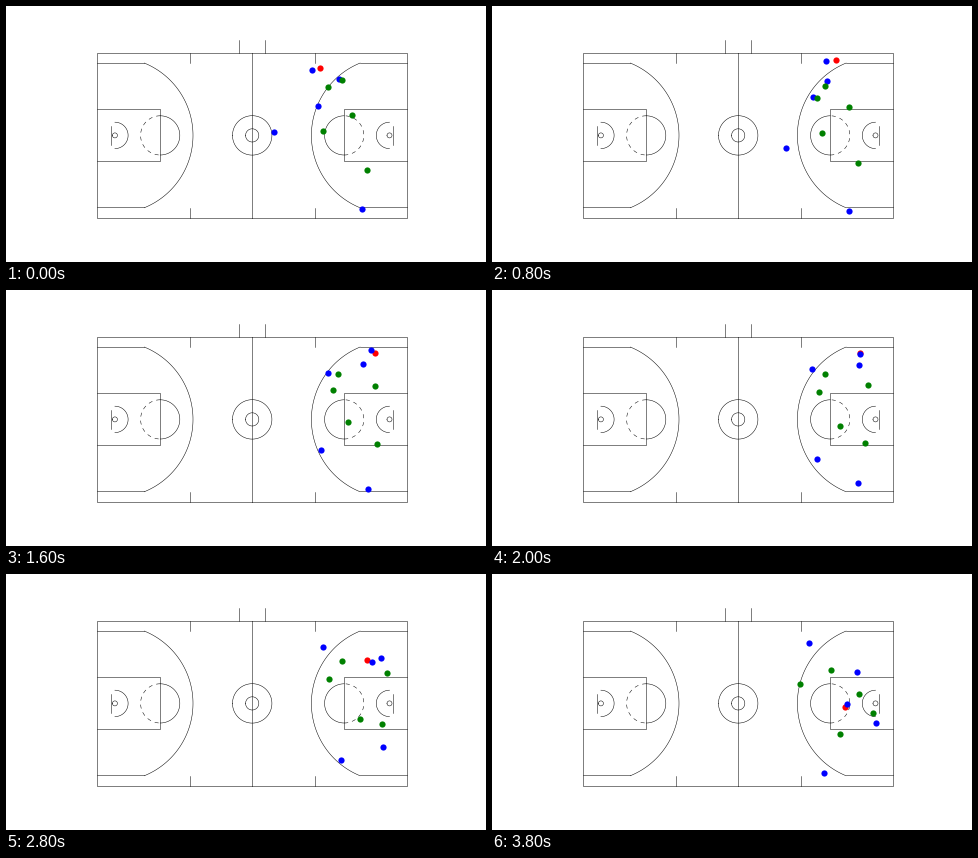
A matplotlib script for the animation above (4000 ms loop, 480 px wide and 256 px high).

```python
import numpy as np
import matplotlib.pyplot as plt
from matplotlib.animation import FuncAnimation
from matplotlib.patches import Circle

W, H, DPI = 480, 256, 100
FRAMES, INTERVAL = 20, 200
LW = 0.5 * 72 / DPI  # half a pixel
CX, CY = 246.2, 129.4
TOP, BOTTOM = 47, 212
STEPS = np.arange(FRAMES)


def run(*points):
    """Smooth path through waypoints spread evenly over the loop."""
    p = np.array(points, float)
    m = np.gradient(p, axis=0, edge_order=2)
    s = STEPS * (len(p) - 1) / (FRAMES - 1)
    i = np.minimum(s.astype(int), len(p) - 2)
    u = (s - i)[:, None]
    ease = u * u * (3 - 2 * u)
    return (p[i] + (p[i + 1] - p[i]) * ease
            + u * (1 - u) * ((1 - u) * m[i] - u * m[i + 1]))


def wave(size, period, peak):
    return size * np.cos(2 * np.pi * (STEPS - peak) / period)


handler = run((306, 64), (332.5, 55), (363, 59), (368.5, 70), (364.4, 97.5),
              (355, 130))
attack = [
    handler,
    run((268, 126), (307, 152), (333, 181), (332, 199)),
    run((333, 73), (337, 75), (365, 74), (375, 85), (365, 98)),
    run((312, 100), (323, 86), (317, 75), (317, 69)),
    run((356, 203), (357.5, 204), (364.5, 194.5), (377.7, 171.5), (384, 149)),
]
defence = [
    run((336, 74), (332, 83), (335, 85), (339, 96)),
    run((322, 81), (326, 97), (325, 104), (308, 110)),
    run((346, 109), (364, 98), (381.5, 96.5), (367, 120)),
    run((317, 125), (337, 130), (353, 141.5), (348, 160)),
    run((361, 164), (369, 154.5), (375, 152), (381, 139)),
]
# The ball swings from one side of its handler to the other.
ball = handler + np.column_stack([2 + wave(8, 24, 3), wave(4.5, 10.5, 7)])

fig = plt.figure(figsize=(W / DPI, H / DPI), dpi=DPI, facecolor="white")
ax = fig.add_axes([0, 0, 1, 1])
ax.set_xlim(0, W)
ax.set_ylim(H, 0)
ax.axis("off")


def line(*pts):
    ax.plot(*zip(*pts), color="black", lw=LW)


def arc(x, r, mid=0, spread=180, ls="-"):
    a = np.radians(np.linspace(mid - spread, mid + spread, 121))
    ax.plot(x + r * np.cos(a), CY - r * np.sin(a), color="black", lw=LW, ls=ls)


def half(side):
    """One half of the court; side is -1 for left, 1 for right."""
    edge, key, board, hoop, corner, hash_x, tick = (
        CX + side * d for d in (155, 92, 141, 137.3, 108, 62.6, 13.1))
    inward = 90 + 90 * side
    line((CX, TOP), (edge, TOP), (edge, BOTTOM), (CX, BOTTOM))
    line((edge, 103), (key, 103), (key, 155), (edge, 155))
    line((board, 120), (board, 139))
    line((tick, TOP - 13), (tick, TOP))
    arc(hoop, 2.5)
    arc(hoop, 13.2, inward, 90)
    arc(key, 19.6, inward, 90)
    arc(key, 19.6, inward + 180, 90, (0, (8, 8)))
    arc(hoop, 78.1, inward, 67.9)
    for y in (57, 201):
        line((edge, y), (corner, y))
    for y in (TOP, BOTTOM - 10):
        line((hash_x, y), (hash_x, y + 10))


half(-1)
half(1)
line((CX, TOP), (CX, BOTTOM))
for r in (19.7, 6.6):
    arc(CX, r)

dots = []
for color, paths in (("red", [ball]), ("blue", attack), ("green", defence)):
    for path in paths:
        dot = ax.add_patch(Circle((0, 0), 3.1, fc=color, ec="none", zorder=3))
        dots.append((dot, np.round(path) + 0.5))


def update(step):
    for dot, path in dots:
        dot.center = path[step]
    return [dot for dot, _ in dots]


anim = FuncAnimation(fig, update, frames=FRAMES, interval=INTERVAL, repeat=True)
plt.show()
```
